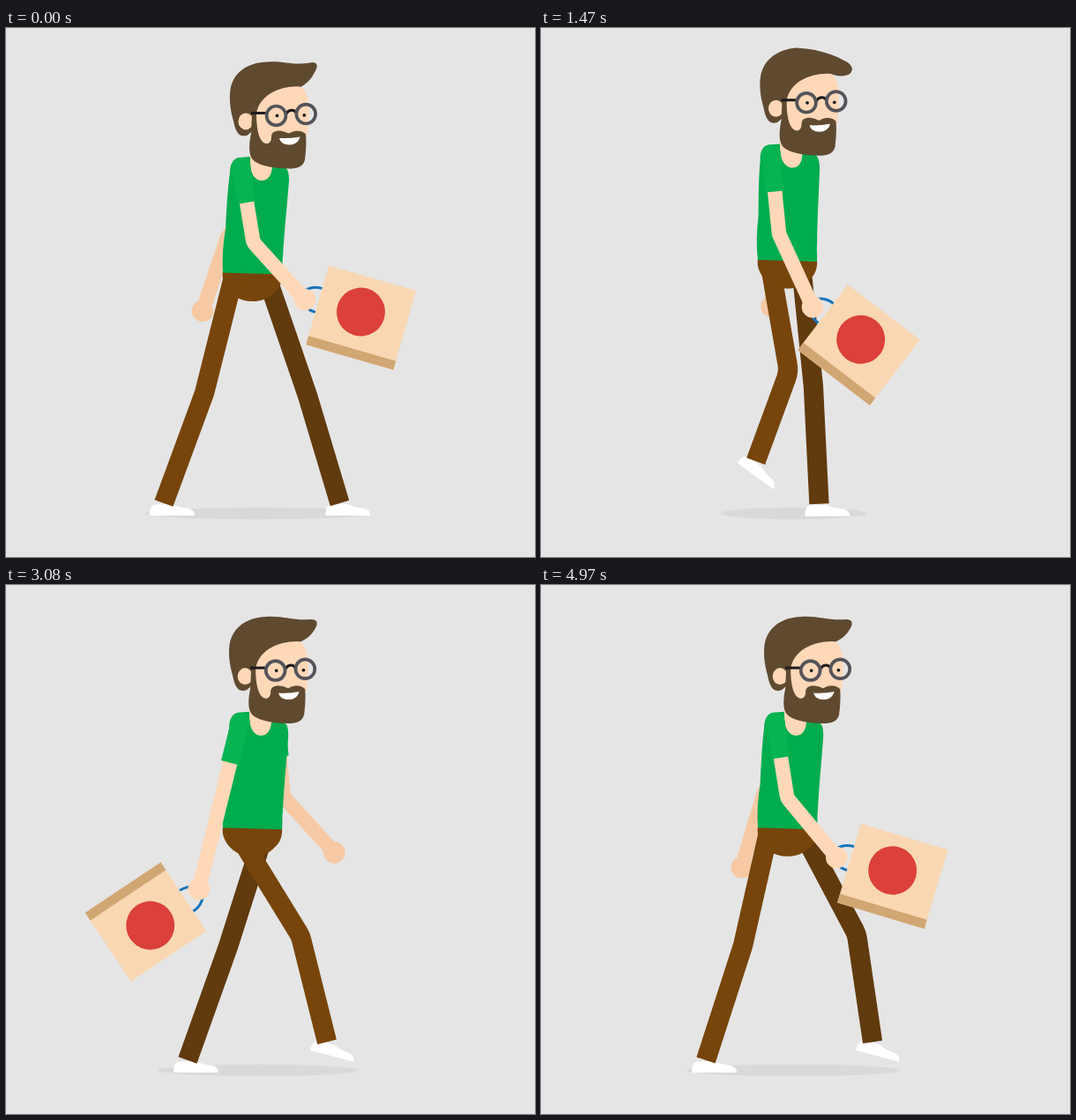
An HTML page with a canvas for the animation above (5.04 s loop, 600 by 600 pixels).

```html
<!DOCTYPE html>
<html lang="en">
<head>
<meta charset="utf-8">
<title>Walking man with a bag</title>
<style>
  html, body { margin: 0; width: 100%; height: 100%; overflow: hidden; background: #e5e5e5; }
  canvas { display: block; width: 600px; height: 600px; }
</style>
</head>
<body>
<canvas id="stage" width="600" height="600"></canvas>
<script>
const ctx = document.getElementById('stage').getContext('2d');
const STEP_MS = 70, CYCLE = 18, TAU = Math.PI * 2;

const C = {
  back: '#e5e5e5', shadow: '#d9d9d9', hair: '#5f4a30', skin: '#ffd8b8', farSkin: '#f6c9a4',
  shirt: '#00ac4d', sleeve: '#08b352', pants: '#77450b', farPants: '#613a0e', shoe: '#ffffff',
  frame: '#55535a', dark: '#1c1a1c', bag: '#f8d7b2', side: '#d0a673', handle: '#1874bb', mark: '#db403a'
};

// Leg keys: [phase, kneeX, kneeY, footX, footY, shoe tilt]
const NEAR_LEG = [
  [0, 225, 414, 179, 547, 0], [1, 250, 411, 199, 535, 11], [3.5, 288, 385, 249, 492, 40],
  [6, 320, 372, 300, 495, 37], [8, 334, 398, 362, 526, 15], [9, 318, 415, 368, 547, 0],
  [10, 304, 410, 346, 547, 0], [15, 247, 400, 235, 546, 0], [17, 229, 409, 187, 547, 0]
];
const FAR_LEG = [
  [0, 242, 414, 190, 547, 0], [1, 260, 411, 197, 528, 11], [3.5, 312, 386, 258, 492, 40],
  [6, 349, 374, 321, 496, 37], [8, 358, 396, 374, 526, 15], [9, 342, 417, 378.5, 547, 0],
  [10, 334, 410, 358, 548, 0], [15, 271, 405, 251, 547, 0], [17, 252, 410, 206, 547, 0]
];

// Smooth periodic interpolation through the keys
function sample(keys, phase) {
  const n = keys.length;
  const key = i => {
    const k = keys[(i + n) % n];
    return [k[0] + Math.floor(i / n) * CYCLE, ...k.slice(1)];
  };
  let i = n - 1;
  while (keys[i][0] > phase) i--;
  const [a, b, c, d] = [key(i - 1), key(i), key(i + 1), key(i + 2)];
  const h = c[0] - b[0], s = (phase - b[0]) / h, s2 = s * s, s3 = s2 * s;
  return [1, 2, 3, 4, 5].map(j => {
    const m0 = (c[j] - a[j]) / (c[0] - a[0]) * h;
    const m1 = (d[j] - b[j]) / (d[0] - b[0]) * h;
    return (2 * s3 - 3 * s2 + 1) * b[j] + (s3 - 2 * s2 + s) * m0 +
           (3 * s2 - 2 * s3) * c[j] + (s3 - s2) * m1;
  });
}

function fill(color, d) {
  ctx.fillStyle = color;
  ctx.fill(new Path2D(d));
}

function line(color, width, d) {
  ctx.strokeStyle = color;
  ctx.lineWidth = width;
  ctx.stroke(new Path2D(d));
}

function disc(color, x, y, rx, ry = rx) {
  ctx.fillStyle = color;
  ctx.beginPath();
  ctx.ellipse(x, y, rx, ry, 0, 0, TAU);
  ctx.fill();
}

function placed(x, y, angle, draw) {
  ctx.save();
  ctx.translate(x, y);
  ctx.rotate(angle);
  draw();
  ctx.restore();
}

// Point at a distance from a towards b
function along(a, b, dist) {
  const len = Math.hypot(b[0] - a[0], b[1] - a[1]);
  return [a[0] + (b[0] - a[0]) * dist / len, a[1] + (b[1] - a[1]) * dist / len];
}

function limb(color, width, start, joint, end, bend) {
  ctx.strokeStyle = color;
  ctx.lineWidth = width;
  ctx.beginPath();
  ctx.moveTo(...start);
  ctx.arcTo(...joint, ...end, bend);
  ctx.lineTo(...end);
  ctx.stroke();
}

function leg(keys, phase, hip, color) {
  const [kneeX, kneeY, footX, footY, degrees] = sample(keys, phase % CYCLE);
  const tilt = degrees * Math.PI / 180;
  const ankle = [footX + 8 * Math.sin(tilt), footY - 8 * Math.cos(tilt)];
  placed(footX, footY, tilt, () =>
    fill(C.shoe, 'M-16 6C-16-1-15-6-9-6.5L8-7C13-5 19-3 25-2.5C31-2 35 1 35 6Z'));
  limb(color, 22.3, hip, [kneeX, kneeY], ankle, 30);
}

function arm(color, shoulder, elbow, hand) {
  limb(color, 16.5, shoulder, elbow, hand, 13);
  disc(color, ...hand, 12.3);
}

function sleeve(color, shoulder, elbow, length) {
  disc(color, ...shoulder, 11);
  limb(color, 21, shoulder, along(shoulder, elbow, length / 2), along(shoulder, elbow, length), 1);
}

// Hangs from the hand, its handle side at a distance of gap
function bag(hand, swing, gap) {
  placed(...hand, swing, () => {
    ctx.translate(gap, 0);
    ctx.strokeStyle = C.handle;
    ctx.lineWidth = 3;
    ctx.beginPath();
    ctx.ellipse(0, -3.5, 20, 14, 0, Math.PI / 2, Math.PI * 1.5);
    ctx.stroke();
    ctx.fillStyle = C.bag;
    ctx.fillRect(0, -44.5, 103, 93.5);
    ctx.fillStyle = C.side;
    ctx.fillRect(0, 38.5, 103, 10.5);
    disc(C.mark, 49.5, -4, 27.5);
  });
}

function hair(droop) {
  const p = (x0, y0, x1, y1) => `${x0 + (x1 - x0) * droop} ${y0 + (y1 - y0) * droop} `;
  fill(C.hair, 'M274 122C263 126 260 116 258 106C254 92 253 80 254.500 70C258 50 275 39.500 ' +
    p(296, 39, 294.5, 37.7) + 'C' +
    p(315, 37.5, 312, 38.2) + p(325, 43, 333, 43) + p(343, 40.3, 349, 52) + 'C' +
    p(352, 38, 358, 56) + p(355, 42, 361, 62) + p(351, 49, 356, 67) + 'C' +
    p(346, 59, 350, 71) + p(341, 64, 341, 70) + p(333, 68, 333, 67) +
    'L310 100L282 115Z');
}

function lens(x, y) {
  ctx.strokeStyle = C.frame;
  ctx.lineWidth = 3.7;
  ctx.beginPath();
  ctx.arc(x, y, 10.9, 0, TAU);
  ctx.stroke();
}

function head(droop) {
  hair(droop);
  fill(C.skin, 'M333 67C310 66 287 77 284 98L282 130L335 135L342 120C344 105 345 84 340 74Q338 69 333 67Z');
  disc(C.skin, 272, 106.5, 8.5, 9.5);
  fill(C.hair, 'M279 97L284 97C284 112 286 127 293 131C298 133 301 130 301 124C301 117 309 116 315 118' +
    'C319 119 321 121 323 119C329 116 337 117 340 121C341 131 340 142 339 150C337 158 330 160 321 160' +
    'C306 160 288 157 281 151C274 145 276 130 278 120Z');
  fill(C.shoe, 'M310 125.5Q322 126 333.500 124C332 130 327 133 321.500 133C315 133 311 130 310 125.500Z');
  line(C.dark, 3, 'M278 97L295.500 97M318 98C320 93 327 92.500 329 97');
  lens(306.5, 100);
  lens(340.2, 98.2);
  disc(C.dark, 307.5, 100, 1.9);
  disc(C.dark, 338.3, 99.5, 1.9);
}

function draw(phase) {
  const theta = phase / CYCLE * TAU;
  const c = Math.cos(theta);
  const rise = (1 - Math.cos(theta * 2)) / 2;
  const up = -19.5 * rise, lean = -7.3 * rise;
  const hipY = 278.5 + up;

  ctx.fillStyle = C.back;
  ctx.fillRect(0, 0, 600, 600);
  disc(C.shadow, 286, 550.5, 124.5 + 4 * c - 58.5 * rise, 6.7);

  // The far arm swings opposite to the near one
  const f = -c;
  const farShoulder = [308 + lean, 168 + up];
  const farElbow = [284 + 33 * f, 240 + 3 * f + up];
  const farHand = [300 + 77 * f, 330.7 - 9 * f - 18.8 * f * f + up];
  arm(C.farSkin, farShoulder, farElbow, farHand);
  sleeve(C.shirt, farShoulder, farElbow, 29);

  leg(FAR_LEG, phase + CYCLE / 2, [294.5, hipY], C.farPants);
  placed(0, hipY, 0, () => fill(C.pants,
    'M246-2L313-2C314 8 311 16 305 21C298 29 289 31.500 279 31.500C265 31.500 255 24 250 16C246 9 245 4 246-2Z'));
  leg(NEAR_LEG, phase, [259, hipY], C.pants);

  ctx.save();
  ctx.transform(1, 0, -lean / 120, 1, lean * 280 / 120, up);
  fill(C.shirt, 'M277 146L264 147C257 148 254 156 254 164C251 185 250 210 249 228C246 245 245 262 246 277.500' +
    'L313 279.500C314 270 313 266 314 260C316 225 319 200 321 173C321 165 320 160 316 158L300 156Z');
  fill(C.skin, 'M277 138L277 153C277 166 283 173 290 173C297 173 302 167 302 155L302 138Z');
  ctx.restore();

  placed(lean, up - 0.6, 0, () => head(rise / 0.75));

  const shoulder = [266.5 + lean, 158 + up];
  const elbow = [259.5 + 21 * c, 253 - 9.8 * c + up];
  const hand = [277 + 62 * c, 345 - 19 * c - 18 * c * c + up];
  const swing = 81.5 - 73 * c + 7.5 * Math.cos(theta * 3);
  bag(hand, swing * Math.PI / 180, 17.4 - 2 * c);
  arm(C.skin, shoulder, elbow, hand);
  sleeve(C.sleeve, shoulder, elbow, 44 - 3.5 * c);
}

function tick() {
  draw(Math.floor(performance.now() / STEP_MS) % CYCLE);
  requestAnimationFrame(tick);
}
tick();
</script>
</body>
</html>
```
